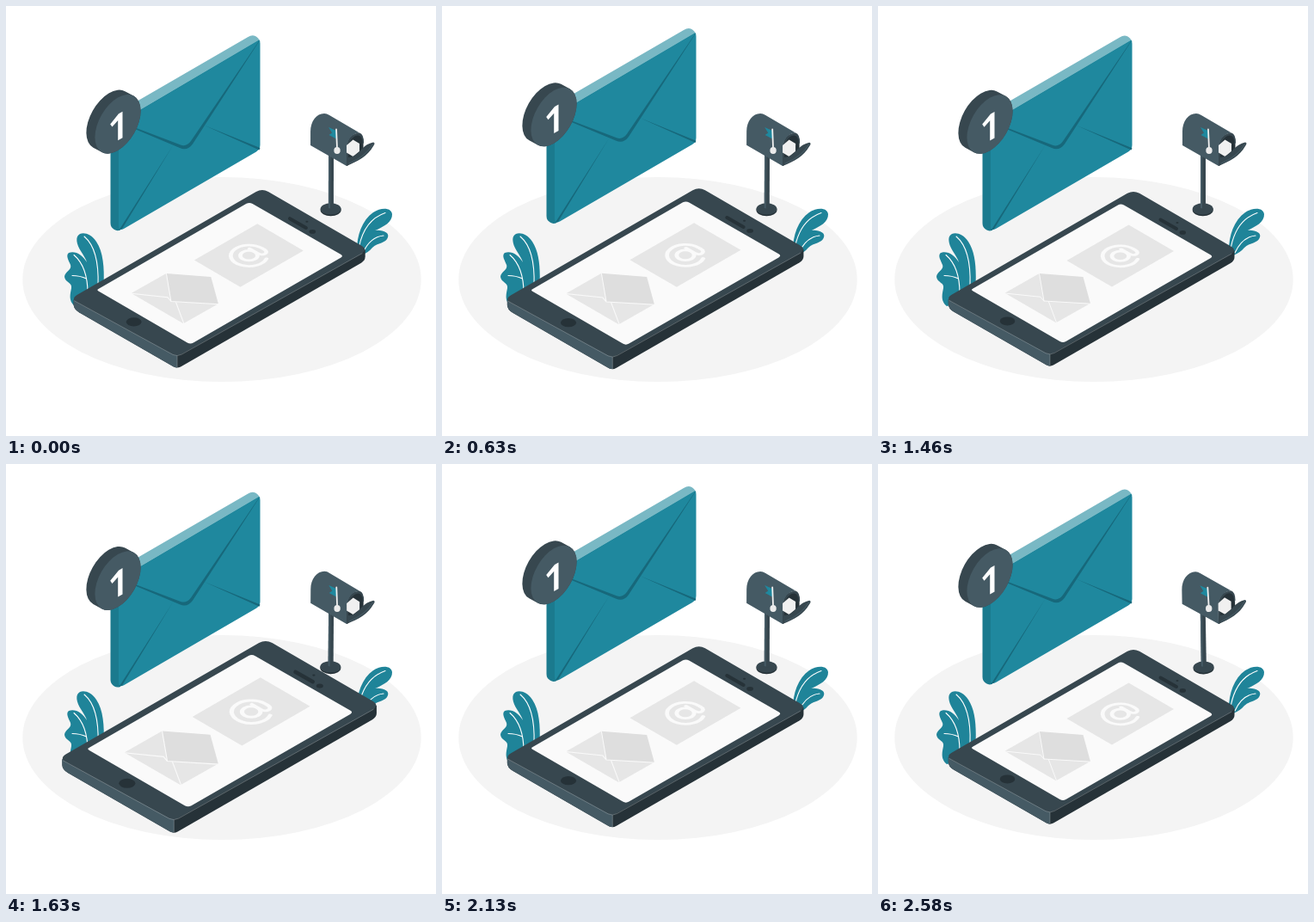
Animation, 500 px wide and 500 px high, one loop 2.62 s. Source, as an HTML page:

```html
<!DOCTYPE html>
<html lang="en">
<head>
<meta charset="utf-8">
<title>New mail</title>
<style>
  html, body { margin: 0; width: 100%; height: 100%; overflow: hidden; background: #fff; }
  svg { display: block; width: 100vw; height: 100vh; }
  .line { fill: none; stroke-linecap: round; stroke-linejoin: round; }
  .leaf { fill: #1f8499; }
  .vein { stroke: #fff; stroke-width: 1.1; }
</style>
</head>
<body>
<svg viewBox="0 0 500 500">
  <ellipse cx="251" cy="318" rx="231.7" ry="119" fill="#f4f4f4"/>

  <g id="leaves">
    <path class="leaf" d="M113.500 325C114.500 304 113 286 105 274C99 265 91 263 86 265C80 268 82 277 87 285C90 290 93 294 94 298C89 289 80 284 73 287C69 290 73 296 75 301C77 307 68 309 68 315C69 322 77 321 76 328C75 334 72 343 80 349L100 345Z"/>
    <path class="line vein" d="M91 268C104 279 108 298 107 325M79 289.500C90 299 95 315 95 334M77 313.500Q86 313.500 93.500 317"/>
    <path class="leaf" d="M408 284C408 267 414 249 427 240C436 234 448 234 449 242C449.500 251 439 257 429 261C439 260 446 264 444 269C442 276 432 275 426 281Q421 287 413 290Z"/>
    <path class="line vein" d="M441 240.500C425 246 415 258 410.500 280M439 267C428 268 420 276 415 287"/>
  </g>

  <g id="box">
    <ellipse cx="377.700" cy="237.300" rx="12" ry="7" fill="#263238"/>
    <ellipse cx="377.700" cy="236" rx="12" ry="6.700" fill="#37474f"/>
    <path d="M375 172H381V235Q378 237.500 375 235Z" fill="#37474f"/>
    <path d="M375 172H377V235.500L375 235Z" fill="#455a64"/>
    <path d="M396 186V166Q397 150 408 148.500Q416 149 415.500 160V175Z" fill="#263238"/>
    <path d="M354 162V146C354 134 361 125 370 125Q373 125 376 127L411 147.500C402 148 396 157 396 168V186Z" fill="#455a64"/>
    <path d="M396 168C396 157 402 148 411 147.500Q416 149 416 159L414.500 161Q414.500 150 409 150.500C402 151 398 159 398 169V185L396 186Z" fill="#37474f"/>
    <path d="M396 162L403.500 155.500L411 160V169L403.500 175L396 170.500Z" fill="#f0f0f0"/>
    <path d="M396 186L397.500 176Q406 176 412 168Q419 160 427 158.500Q430 159 427 163C420 175 410 180 396 186Z" fill="#37474f"/>
    <path d="M399 183C411 178 420 172 427 160" class="line" stroke="#455a64" stroke-width="1"/>
    <path d="M375 141L384 145V154.500L375.500 150L379 147.500Z" fill="#1f889e"/>
    <path d="M384 143.500L385 166" class="line" stroke="#f0f0f0" stroke-width="1.800"/>
    <ellipse cx="385" cy="168" rx="3.700" ry="4" fill="#ebebeb"/>
  </g>

  <g id="phone">
    <path d="M81.800 341V347Q82 352 88 355.500L196 417.600Q200 419.700 204 417.500L410 299Q414.500 296.200 414.500 292V284L300 300Z" fill="#263238"/>
    <path d="M81.800 341V347Q82 352 88 355.500L196 417.600Q198 418.500 200 418.500V403Z" fill="#455a64"/>
    <path d="M86 335.500L290 217.800Q297 214 304 217.800L410 279.300Q418 283.800 410 288.700L205 403Q200 406.300 195 403.500L87 345Q77.800 340.200 86 335.500Z" fill="#37474f"/>
    <path d="M83 342.500L195 403.700Q200 406.300 205 403.500L411 288.200M200 405.500V418" class="line" stroke="#fff" stroke-opacity=".32" stroke-width=".7"/>
    <path d="M110.500 328.600L279 231.400Q282.500 229.600 286 231.600L386.500 289.300Q390 291.300 386.500 293.300L218.500 390Q215 392 211.500 390L110.500 331.500Q107.500 330 110.500 328.600Z" fill="#fafafa"/>
    <ellipse cx="150.500" cy="366.400" rx="8.700" ry="5" fill="#263238"/>
    <path d="M328.500 248.500L347 259" class="line" stroke="#263238" stroke-width="4"/>
    <ellipse cx="354.300" cy="263.400" rx="3.700" ry="2.300" fill="#263238"/>
    <ellipse cx="348" cy="252" rx="1.500" ry="1" fill="#263238"/>

    <path d="M219.500 296L291.500 254.500L344 285L272 326.500Z" fill="#e6e6e6"/>
    <g transform="matrix(.866 -.5 .866 .5 281.800 290.700)">
      <path class="line" stroke="#fafafa" stroke-width="3.800" d="M8 15.200A17 17 0 1 1 17 0V3C17 10.500 8.300 10.500 8.300 3V-7.500"/>
      <circle r="8" fill="none" stroke="#fafafa" stroke-width="3.800"/>
    </g>

    <path d="M147.500 333.800L187.500 311L246.500 346L207 368.300Z" fill="#e6e6e6"/>
    <path d="M187.500 311L238.500 315L247 346L193 343Z" fill="#dedede"/>
    <path d="M147.500 334L189 338.300L193 343L247 346.200M187.500 311L193 343M198.500 344L207.500 368" class="line" stroke="#fafafa" stroke-width="1"/>
  </g>

  <g id="mail">
    <path d="M121.500 132V253Q121.500 258 126 260.500Q129 262.500 133 261L140 140Z" fill="#1b7a8e"/>
    <path d="M121.500 134Q122 129 126 126.500L281 36.700Q286 33.500 290 35.500Q294 37.500 295.500 42L131 139Z" fill="#79b8c4"/>
    <path d="M131 141Q131 136 136 133.200L294.300 40Q295.500 41.500 295.500 44V162Q295.500 167 291 169.800L137 259.300Q131 262.500 131 256Z" fill="#1f889e"/>
    <path d="M131.500 261L194.500 162L135 259.500ZM295.500 165.500L230 138.800L294.500 167.800Z" fill="#17687b"/>
    <path d="M132 136L202 165.300Q211 169.200 217 160.800L295 40.500Z" fill="#17687b"/>
    <path d="M132 135L203 162Q210 164.500 215 157.500L295 40L140 131Z" fill="#1f889e"/>
    <g transform="matrix(.866 -.5 0 1 130 137.700)">
      <path d="M0 0L-11.600 -11.200" class="line" stroke="#37474f" stroke-width="61.400"/>
      <circle r="30.700" fill="#455a64"/>
    </g>
    <path d="M131 125.700L135.500 123.100V153.600L130.200 156.600V133.500L123.500 141L121.200 137.800Z" fill="#fff"/>
  </g>
</svg>
<script>
const LOOP = 2620, FPS = 24, CYCLE = 36, LEAD = 0.019;
const $ = id => document.getElementById(id);

// [phase, value] pairs, linear in between
const tracks = {
  float: [[0, 0], [0.5, -10], [1, 0]],
  beat: [[0, 1], [0.1, 1.1], [0.3, 1], [0.4, 1], [0.5, 1.1], [0.6, 1], [1, 1]],
  wind: [[0, 0], [0.25, 1], [0.75, -1], [1, 0]]
};

function sample(track, p) {
  const i = track.findIndex(([at]) => at > p);
  const [a, from] = track[i - 1], [b, to] = track[i];
  return from + (to - from) * (p - a) / (b - a);
}

function draw(ms) {
  const step = Math.floor((ms % LOOP + 4.9) * FPS / 1000);
  const p = (step / CYCLE + LEAD) % 1;
  const put = (id, value) => $(id).setAttribute('transform', value);
  put('mail', `translate(0 ${sample(tracks.float, p)})`);
  put('phone', `translate(248 317) scale(${sample(tracks.beat, p)}) translate(-248 -317)`);
  put('box', `rotate(${sample(tracks.wind, p)} 391.5 184.5)`);
}

const start = performance.now();
function tick() {
  draw(performance.now() - start);
  requestAnimationFrame(tick);
}
tick();
</script>
</body>
</html>
```
